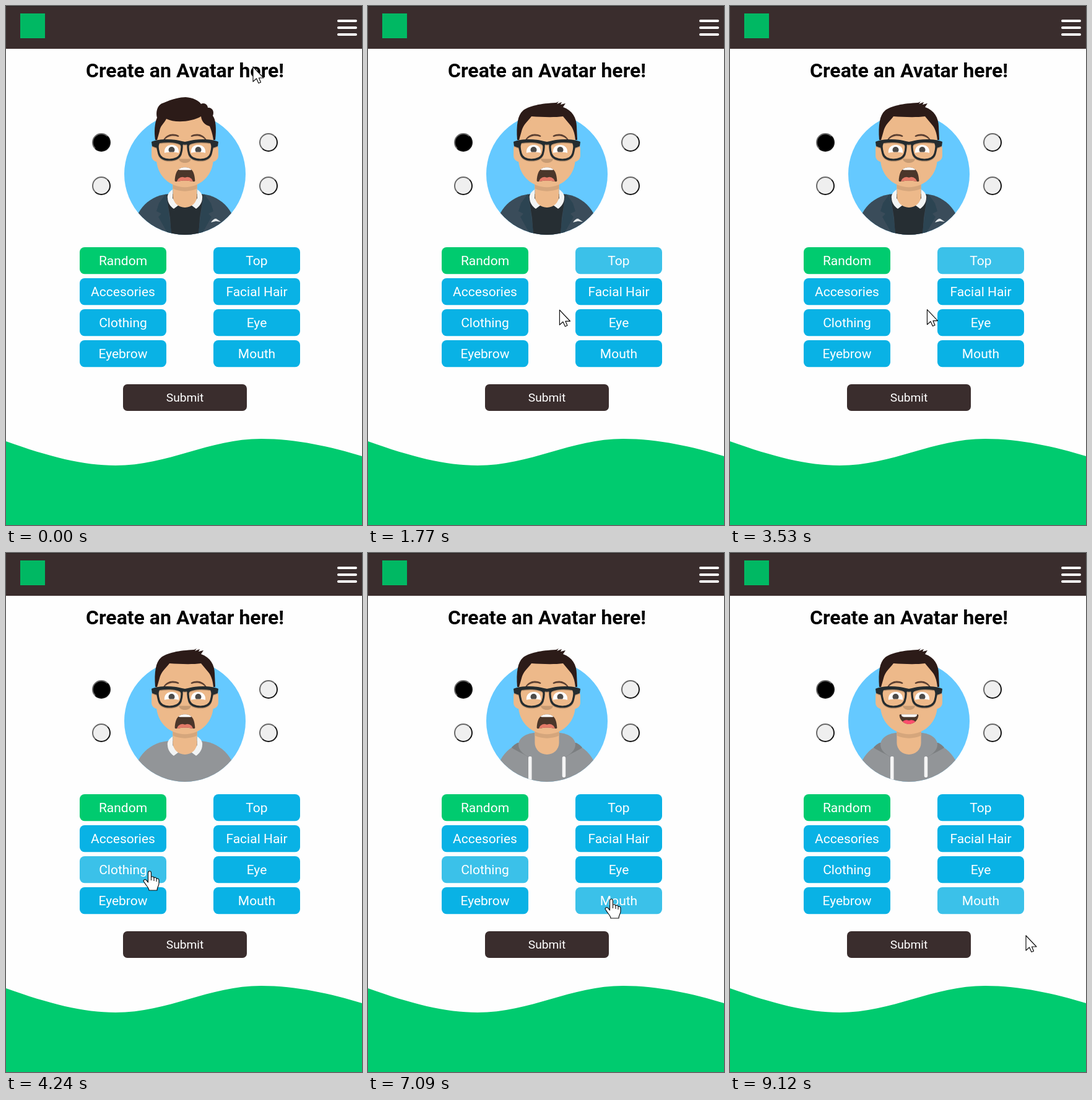
An HTML page with a canvas for the animation above (9.67 s loop, 575 px wide and 837 px high).

```html
<!DOCTYPE html>
<html lang="en">
<head>
<meta charset="utf-8">
<title>Avatar maker</title>
<style>
html, body { margin: 0; width: 100%; height: 100%; overflow: hidden; background: #fefefe; }
canvas { display: block; width: 575px; height: 837px; }
</style>
</head>
<body>
<canvas id="stage"></canvas>
<script>
const W = 575, H = 837, LOOP = 9670;
const canvas = document.getElementById('stage');
const ctx = canvas.getContext('2d');
const dpr = window.devicePixelRatio || 1;
canvas.width = W * dpr;
canvas.height = H * dpr;

const DARK = '#3a2d2d', GREEN = '#00cb6f', BLUE = '#09b2e5', LIT = '#3bc1e9';
const SKIN = '#edb98a', HAIR = '#2c1b18', GREY = '#929598';

function fill(path, color) {
  ctx.fillStyle = color;
  ctx.fill(typeof path === 'string' ? new Path2D(path) : path);
}
function line(d, color, width) {
  ctx.strokeStyle = color;
  ctx.lineWidth = width;
  ctx.stroke(new Path2D(d));
}
function box(x, y, w, h, r, color) {
  ctx.fillStyle = color;
  ctx.beginPath();
  ctx.roundRect(x, y, w, h, r);
  ctx.fill();
}
function oval(x, y, rx, ry, color, turn = 0) {
  ctx.fillStyle = color;
  ctx.beginPath();
  ctx.ellipse(x, y, rx, ry, turn, 0, 7);
  ctx.fill();
}
function label(text, x, y, size, weight, color) {
  ctx.font = `${weight} ${size}px Roboto, Arial, sans-serif`;
  ctx.textAlign = 'center';
  ctx.fillStyle = color;
  ctx.fillText(text, x, y);
}
function scoped(draw) {
  ctx.save();
  draw();
  ctx.restore();
}
// Draws a shape and its reflection about the face axis
function mirrored(draw) {
  draw();
  scoped(() => {
    ctx.translate(578, 0);
    ctx.scale(-1, 1);
    draw();
  });
}

// ---- Buttons ----
const names = ['Random', 'Top', 'Accesories', 'Facial Hair', 'Clothing', 'Eye', 'Eyebrow', 'Mouth'];
const buttons = names.map((name, i) => ({
  name, x: i % 2 ? 335 : 119, y: 389 + 50 * (i >> 1), w: 140, h: 43.3
}));
const inside = (b, p) => p.x >= b.x && p.x < b.x + b.w && p.y >= b.y && p.y < b.y + b.h;

// Buttons that stay lit after the pointer has left: name, from, to
const held = [['Top', 690, 3920], ['Clothing', 3920, 7260], ['Mouth', 7090, LOOP]];
// Clicks: name, from, to, whether the button grows
const clicks = [
  ['Top', 920, 990, true], ['Clothing', 4000, 4080, true], ['Clothing', 4950, 5020, true],
  ['Clothing', 5720, 5790, false], ['Mouth', 7260, 7330, true], ['Mouth', 7730, 7810, true]
];
const during = (list, t) => list.filter(e => t >= e[1] && t < e[2]);

function drawButton(b, lit, big) {
  scoped(() => {
    const cx = b.x + b.w / 2, cy = b.y + b.h / 2;
    ctx.translate(cx, cy);
    if (big) ctx.scale(1.1, 1.1);
    box(-b.w / 2, -b.h / 2, b.w, b.h, 8, b.name === 'Random' ? GREEN : lit ? LIT : BLUE);
    label(b.name, 0, 7.5, 21, 400, '#fff');
  });
}

// ---- Pointer ----
// Moves: start, last step, step count, points along the way
const moves = [
  [70, 690, 9, [[399, 98], [403, 463], [392, 415]]],
  [1160, 1310, 3, [[392, 415], [366, 432]]],
  [1690, 2150, 7, [[366, 432], [300, 500], [235, 530], [225, 470]]],
  [2300, 2540, 4, [[225, 470], [347, 471], [400, 478]]],
  [2920, 3840, 13, [[400, 478], [365, 488], [310, 490], [261, 511]]],
  [3920, 4000, 2, [[261, 511], [232, 513]]],
  [4390, 4550, 3, [[232, 513], [222, 512]]],
  [6170, 6250, 2, [[222, 512], [221, 513]]],
  [6480, 7090, 9, [[221, 513], [393, 558]]],
  [7880, 7960, 2, [[393, 558], [400, 558]]],
  [8190, 8190, 1, [[400, 558], [404, 558]]],
  [8340, 8340, 1, [[404, 558], [407, 557]]],
  [8740, 9120, 6, [[407, 557], [478, 617]]]
];
function pointerAt(t) {
  const m = moves.filter(m => t >= m[0]).pop();
  if (!m) return { x: 399, y: 98 };
  const [start, end, n, pts] = m;
  const step = n > 1 ? Math.floor((t - start) / ((end - start) / (n - 1)) + 1e-6) : 0;
  const u = Math.min(1, (step + 1) / n) * (pts.length - 1);
  const i = Math.min(Math.floor(u), pts.length - 2), f = u - i;
  const mix = k => pts[i][k] + (pts[i + 1][k] - pts[i][k]) * f;
  return { x: mix(0), y: mix(1) };
}
const ARROW = 'M0,0 V24 L5.5,19 L9,26.5 L12.5,25 L9.5,18 H17 Z';
const HAND = 'M-2.5,3 C-2.5,-1 2.5,-1 2.5,3 V10 C3,8 7,8.5 7,11 C8,9.5 11,10 11,12.5 ' +
  'C13,11 15,12.5 15,14.5 V20 C15,24 12,26 12,31 H-1 C-1,27 -6,23 -8,19 L-10,16 C-9,13 -6,13 -5,15 L-2.5,18 Z';
function drawPointer(p, hand) {
  scoped(() => {
    ctx.translate(p.x, p.y);
    ctx.lineJoin = 'round';
    fill(hand ? HAND : ARROW, '#fff');
    line(hand ? HAND : ARROW, '#111', 1.2);
    if (hand) line('M2.5,10 V15 M7,11 V16 M11,13 V17', '#111', 1.1);
  });
}

// ---- Avatar ----
const SHOULDERS = 'M267,303 C233,303 207,329 207,361.5 V372 H371 V361.5 C371,329 344,303 311,303 Z';
const HEAD = 'M44,99.9 C38.5,99 34,94 34,88 V74 C34,68 38.3,63.1 44,62.2 V56 C44,25 69,0 100,0 ' +
  'C131,0 156,25 156,56 V62.2 C161.7,63.1 166,68 166,74 V88 C166,94 161.5,99 155.7,99.9 ' +
  'C153,128 130,150 100,150 C70,150 47,128 44,99.9 Z';
const CURLY = 'M241,216 C239,203 240,189 244,180 C242,173 243,159 255,156 C268,150 282,147 290,147 ' +
  'C302,148 311,152 315,158 C320,155 326,159 326,164 C333,163 337,170 334,177 C339,183 340,198 338,216 ' +
  'L335,216 C334,207 331,199 329,194 C322,192 316,187 315,178 C300,187 273,189 259,182 ' +
  'C255,190 249,193 248,202 L244,216 Z';
const FLAT = 'M241,216 C239,192 242,176 250,169 C259,161 280,157 304,156 L308,154 L305,158 L313,155 ' +
  'L311,159 L319,157 L315,163 C330,168 337,181 337,194 L338,216 L335,216 C334,205 331,196 325,190 ' +
  'L315,178 C300,180 280,179 264,178 C258,186 250,192 248,202 L244,216 Z';

function drawCollar() {
  mirrored(() => fill('M269,296 C263,300 260,305 261,310 C261,317 266,324 271,327 L279,321 L269,310 Z', '#f2f4f4'));
}
const clothes = {
  blazer() {
    fill(SHOULDERS, '#3a4c5a');
    fill('M259,304 H319 L313,342 L311,372 H267 L265,342 Z', '#262e33');
    mirrored(() => fill('M258,303 L247,318 L243,331 L251,335 L246,340 L264,372 H268 L262,325 Z', '#2c4452'));
    fill('M331,349 C335,343 339,342 341,344 L347,348 L339,347 Z', '#e6eaec');
    drawCollar();
  },
  sweater() {
    fill(SHOULDERS, GREY);
    drawCollar();
  },
  tee() {
    fill(SHOULDERS, GREY);
    fill('M262,303 C262,316 274,323 289,323 C304,323 316,316 316,303 Z', SKIN);
    oval(289, 342, 15.5, 14, '#fff');
    box(279, 348, 20, 11, 3, '#fff');
    box(285, 352, 7, 9, 2, '#fff');
    oval(282.5, 341, 4.1, 6, GREY, 0.5);
    oval(296, 341, 4.1, 6, GREY, -0.5);
    fill('M289,346 L286,351 H292 Z', GREY);
    line('M284,355 V361 M293,354 V360', GREY, 1.2);
  },
  hoodie() {
    fill(SHOULDERS, GREY);
    mirrored(() => fill('M242,306 C236,309 233,312 232,314 C241,320 254,325 262,331 L269,325 L248,306 Z', '#7c7f81'));
    fill('M269,290 C253,291 243,300 243,309 C243,319 253,326 262,330 H316 C325,326 335,319 335,309 ' +
      'C335,300 325,291 309,290 Z', GREY);
    box(259, 328, 5.5, 48, 2, '#f4f4f4');
    box(313.7, 328, 5.5, 34, 2.7, '#f4f4f4');
  }
};

// Mouths use the figure's own units
const SMILE = 'M35.1,15.1 C36.2,24.6 44.2,32 54,32 C63.8,32 71.9,24.6 72.9,15 C73,14.3 72.1,13 71,13 H37 C35.9,13 35,14.2 35.1,15.1 Z';
const SCREAM = 'M74,38.9 C72.9,24.9 69.8,13 54,13 C38.2,13 35.1,24.9 34,39 C33.9,40.1 34.8,41 36,41 ' +
  'C42.6,41 45.3,39 54,39 C62.7,39 67,41 72,41 C73.1,41 74.1,40.1 74,38.9 Z';
function openMouth(shape, top, tongue) {
  const path = new Path2D(shape);
  fill(path, '#4b362a');
  ctx.clip(path);
  box(39, 2, 31, 16, 5, '#fff');
  oval(49, top + 11, 11, 11, tongue);
  oval(59, top + 11, 11, 11, tongue);
}
const mouths = {
  scream: () => openMouth(SCREAM, 32, '#e47a68'),
  serious: () => box(42, 18, 24, 6, 3, '#4b362a'),
  smile: () => openMouth(SMILE, 24, '#ff4f6d')
};
function units(x, y, draw) {
  scoped(() => {
    ctx.translate(181.2, 140.3);
    ctx.scale(0.8167, 0.8167);
    ctx.translate(x, y);
    draw();
  });
}

function drawEye() {
  scoped(() => {
    const lid = new Path2D('M256,237 C255,228 261,224 268,224 C275,224 280,229 279,237 C273,235 262,235 256,237 Z');
    fill(lid, '#fff');
    ctx.clip(lid);
    oval(267.5, 232, 5, 5, '#4d4b49');
  });
}
const LENS = 'M246,219 C258,216.5 273,217 282,220 C285,222 284.5,231 282,239 C279,246 272,248 264,248 ' +
  'C255,248 249,245 247,238 C245,231 244,222 246,219 Z';
function drawGlasses(color) {
  mirrored(() => {
    line(LENS, color, 3.2);
    fill('M235,219 C246,214 270,214 284,218 L289,219 V224 C286,223 284,224 283,226 ' +
      'C281,220 262,219 248,221 L245,229 L241,228 L236,226 Z', color);
  });
}

function drawAvatar(hair, outfit, mouth) {
  oval(289, 271, 98, 98, '#65c9ff');
  scoped(() => {
    ctx.clip(new Path2D('M191,130 H387 V271 A98,98 0 0 1 191,271 Z'));
    clothes[outfit]();
    const neck = new Path2D(`M269.4,280 H308.6 V${outfit === 'tee' ? 303 : 306} a19.6,19 0 0 1 -39.2,0 Z`);
    fill(neck, SKIN);
    scoped(() => {
      ctx.clip(neck);
      units(32, 44, () => fill(HEAD, '#d5a67c'));
    });
    units(32, 36, () => fill(HEAD, SKIN));
  });
  units(104, 122, () => fill('M16,8 C16,12.4 21.4,16 28,16 C34.6,16 40,12.4 40,8 Z', 'rgba(0,0,0,.16)'));
  units(78, 134, mouths[mouth]);
  mirrored(() => {
    drawEye();
    fill('M254,216 C259,207 269,204 279,209 C280,210 279,211 278,211 C269,208 261,210 256,216 Z', '#5c4032');
  });
  fill(hair, HAIR);
  scoped(() => {
    ctx.translate(0, 1.6);
    drawGlasses('rgba(0,0,0,.16)');
  });
  drawGlasses('#252c2f');
}

// ---- Page ----
function drawSwatch(x, y, color) {
  oval(x, y, 14, 14, color);
  ctx.lineWidth = 2;
  [['#696969', 0.75], ['#161616', 1.75]].forEach(([c, a]) => {
    ctx.strokeStyle = c;
    ctx.beginPath();
    ctx.arc(x, y, 14, a * Math.PI, (a + 1) * Math.PI);
    ctx.stroke();
  });
}
function drawPage() {
  ctx.fillStyle = '#fefefe';
  ctx.fillRect(0, 0, W, H);
  ctx.fillStyle = DARK;
  ctx.fillRect(0, 0, W, 69);
  ctx.fillStyle = '#2a2121';
  ctx.fillRect(0, 0, W, 1);
  box(23, 12, 40, 40, 0, '#00b863');
  for (let i = 0; i < 3; i++) box(535, 22 + 11 * i, 32, 4, 2, '#fff');
  label('Create an Avatar here!', 289, 115, 32, 700, '#000');
  drawSwatch(154, 220, '#000');
  [[154, 290], [424, 220], [424, 290]].forEach(([x, y]) => drawSwatch(x, y, '#efefef'));
  box(189, 610, 200, 43, 7, DARK);
  label('Submit', 289, 638, 19.2, 400, '#fff');
  fill('M0,702 C70,727 125,741 177,741 C262,741 328,698 412,698 C470,698 525,711 575,726 V837 H0 Z', GREEN);
}

function render(t) {
  ctx.setTransform(dpr, 0, 0, dpr, 0, 0);
  drawPage();
  drawAvatar(
    t < 1230 ? CURLY : FLAT,
    t < 4240 ? 'blazer' : t < 5330 ? 'sweater' : t < 5940 ? 'tee' : 'hoodie',
    t < 7500 ? 'scream' : t < 8190 ? 'serious' : 'smile'
  );
  const p = pointerAt(t);
  const lit = during(held, t).map(e => e[0]);
  const click = during(clicks, t)[0];
  buttons.forEach(b => drawButton(b, inside(b, p) || lit.includes(b.name), click && click[3] && click[0] === b.name));
  drawPointer(p, buttons.some(b => inside(b, p)));
  if (click) oval(p.x, p.y, 18, 18, 'rgba(255,255,0,.5)');
}

const began = performance.now();
function tick() {
  render((performance.now() - began) % LOOP);
  requestAnimationFrame(tick);
}
tick();
</script>
</body>
</html>
```
